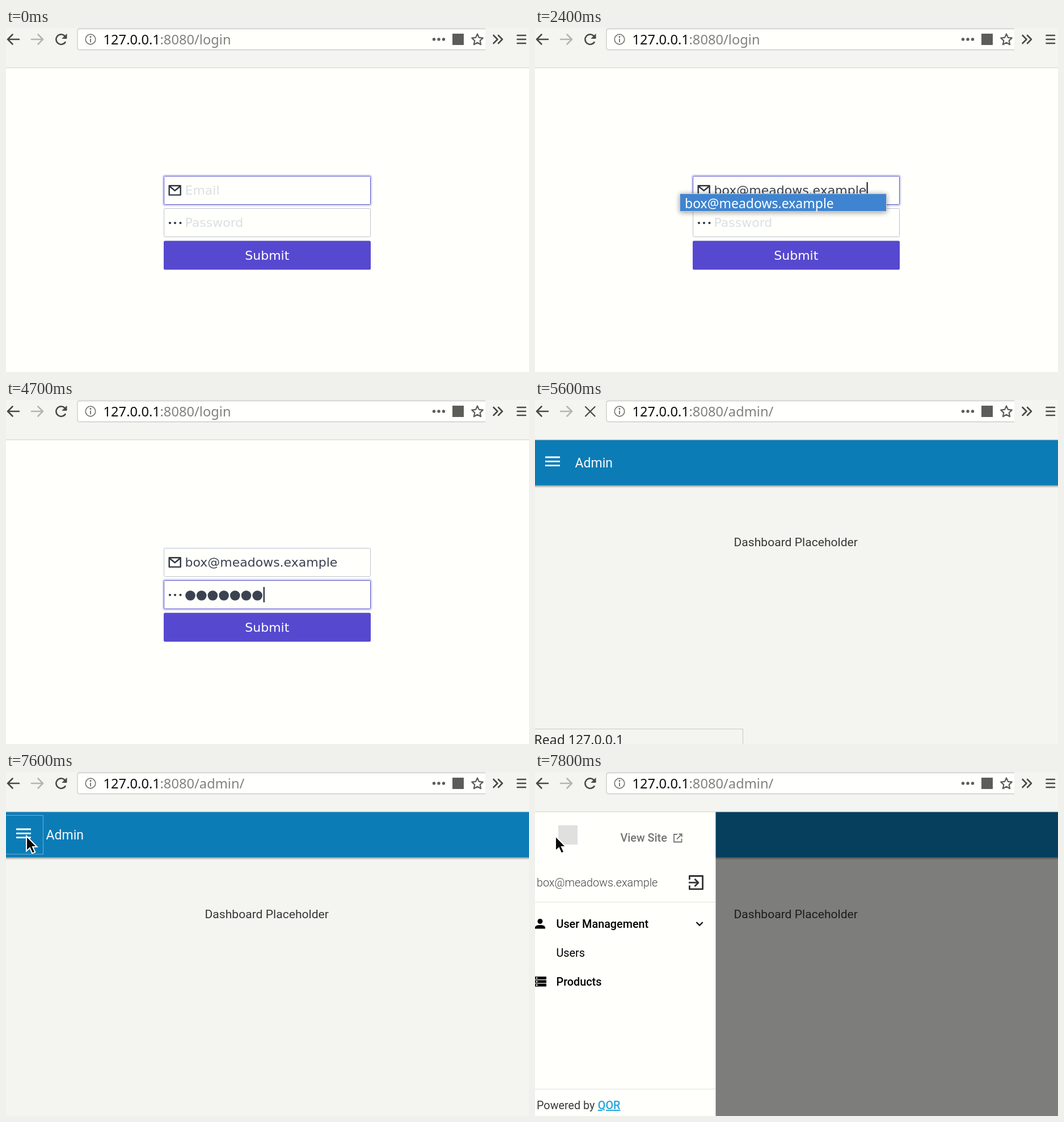
An HTML page that plays this animation: 922x607 px, repeating every 8000 ms.

```html
<!DOCTYPE html>
<html lang="en">
<head>
<meta charset="utf-8">
<title>Login and admin menu</title>
<style>
  html, body { margin: 0; width: 100%; height: 100%; overflow: hidden; background: #fffffc; }
  svg { display: block; width: 922px; height: 607px; }
  text { white-space: pre; }
  .ui { font: 23px "Noto Sans", sans-serif; }
  .url { font-size: 23.7px; }
  .form { font: 22px "DejaVu Sans", sans-serif; }
  .app { font: 19.8px Roboto, sans-serif; }
  .mid { font-weight: 500; }
  .line { fill: none; stroke: #484844; stroke-width: 2.6; stroke-linecap: round; stroke-linejoin: round; }
</style>
</head>
<body>
<svg viewBox="0 0 922 607">
  <defs>
    <filter id="blur" x="-20%" y="-80%" width="140%" height="260%"><feGaussianBlur stdDeviation="5"/></filter>
    <linearGradient id="fall" x2="0" y2="1">
      <stop stop-opacity=".4"/><stop offset="1" stop-opacity="0"/>
    </linearGradient>
  </defs>

  <g id="login">
    <rect y="70" width="922" height="537" fill="#fffffc"/>
    <g fill="#fffffc">
      <rect id="emailRing" x="277" y="260" width="367" height="53" rx="3" fill="none" stroke="#5755d9" stroke-width="3"/>
      <rect id="emailBox" x="278.5" y="261.5" width="364" height="50" rx="2"/>
      <rect id="passRing" x="277" y="317" width="367" height="53" rx="3" fill="none" stroke="#5755d9" stroke-width="3"/>
      <rect id="passBox" x="278.5" y="318.5" width="364" height="50" rx="2"/>
    </g>
    <rect x="278" y="375.5" width="365" height="51" rx="2.5" fill="#5649cf"/>
    <g class="form" fill="#3b4351">
      <path d="M287.7 278.2h20v16.4h-20zM288 279l9.7 8 9.7-8" fill="none" stroke="#303742" stroke-width="2.4" stroke-linejoin="round"/>
      <g fill="#303742"><circle cx="289" cy="344" r="2.1"/><circle cx="298" cy="344" r="2.1"/><circle cx="307.5" cy="344" r="2.1"/></g>
      <text id="emailHint" x="315.5" y="294" fill="#dcdfe2">Email</text>
      <text id="email" x="315.5" y="294"></text>
      <text id="passHint" x="315.5" y="351" fill="#dcdfe2">Password</text>
      <g id="dots"></g>
      <text x="460.3" y="409.3" text-anchor="middle" fill="#fffffc">Submit</text>
    </g>
    <rect id="caret" width="2.4" height="27" fill="#303742"/>
    <g id="popup">
      <rect x="255" y="293" width="365" height="33" opacity=".38" filter="url(#blur)"/>
      <rect id="row" x="255.5" y="292.5" width="364" height="31" stroke="#d0d0ce"/>
      <text id="choice" class="ui" x="264" y="318"></text>
    </g>
  </g>

  <g id="admin" class="app">
    <rect y="70" width="922" height="537" fill="#f4f4f0"/>
    <rect y="150" width="922" height="5" fill="url(#fall)"/>
    <rect y="70" width="922" height="80.5" fill="#0c7cb7"/>
    <path d="M18 101h26M18 108.3h26M18 115.6h26" stroke="#fff" stroke-width="2.8"/>
    <text x="70.5" y="119" font-size="23" fill="#f5fafc">Admin</text>
    <text x="350.5" y="258" font-size="21.1" fill="#373735">Dashboard Placeholder</text>
    <rect id="ring" x="-1" y="76.5" width="66.5" height="68.5" fill="none" stroke="#d5e8f2" stroke-dasharray="1 1"/>
    <rect id="shade" y="70" width="922" height="537"/>
    <g id="drawer">
      <rect y="70" width="318.5" height="537" fill="#fffffc"/>
      <rect x="41" y="94" width="34" height="34" fill="#e0e0de"/>
      <g fill="none" stroke="#757573" stroke-width="1.8">
        <path d="M251 110h-6v13.5h13.5v-6M253.5 109.5h5.3v5.3M258.5 110l-8.5 8.5"/>
        <path d="M272.4 190v-6.500h23.200v23.200h-23.200v-6.500M271 195.200h16M281.500 188.700l6.500 6.500-6.500 6.500" stroke="#333" stroke-width="2.800" stroke-linejoin="round"/>
        <path d="M284.5 265l5.6 5.6 5.6-5.6" stroke="#111" stroke-width="2.3"/>
        <path d="M0 229.5h318M0 559.5h318" stroke="#e0e0de" stroke-width="1"/>
      </g>
      <text class="mid" x="150.5" y="123" fill="#757573">View Site</text>
      <text id="account" x="3" y="202" font-weight="300" fill="#444"></text>
      <circle cx="9" cy="263.5" r="4.5"/>
      <path d="M0 276.5v-2.5q1-4 9-4t9 4v2.5z"/>
      <text class="mid" x="37.5" y="275">User Management</text>
      <text x="37.5" y="326">Users</text>
      <path d="M0 361h20v5H0zM0 367.3h20v5H0zM0 373.6h20v5H0z"/>
      <path d="M1.5 363.5h3M1.5 369.8h3M1.5 376.1h3" stroke="#fffffc" stroke-width="2"/>
      <text class="mid" x="37.5" y="377">Products</text>
      <text x="3" y="595" fill="#3a3a38">Powered by</text>
      <text class="mid" x="110.8" y="595" fill="#25a5dc" text-decoration="underline">QOR</text>
    </g>
  </g>

  <g id="status">
    <rect x="-1" y="580.5" width="367.5" height="30" fill="#f4f4f0" stroke="#c8c8c4"/>
    <text id="message" class="ui" x="-1.5" y="607.5" fill="#2c2c2a"></text>
  </g>

  <rect width="922" height="70" fill="#f4f4f0"/>
  <path d="M0 70.2h922" stroke="#cfcfcb"/>
  <path d="M845 1.5H130q-4 0-4 4v29q0 4 4 4h715z" fill="#fffffc"/>
  <path d="M845 1.5H130q-4 0-4 4v29q0 4 4 4h715" fill="none" stroke="#cbcbc7" stroke-width="1.3"/>
  <g class="line">
    <path d="M3 20h20M11.5 11.5L3 20l8.5 8.5"/>
    <path d="M45 20h20M56.5 11.5L65 20l-8.5 8.5" stroke="#b4b4b0"/>
    <g id="reload">
      <path d="M104.5 25A8.800 8.800 0 1 1 103.500 14"/>
      <path d="M107 11v7.500h-7.500z" fill="#484844" stroke-width="1"/>
    </g>
    <path id="stop" d="M89 12l16.5 16.5M105.5 12L89 28.5" stroke-width="2.3"/>
    <path d="M831 10.5l2.9 6.4 6.9.8-5.1 4.7 1.4 6.9-6.1-3.5-6.1 3.5 1.4-6.9-5.1-4.7 6.9-.8z" stroke="#5c5c58" stroke-width="2.2"/>
    <path d="M859.5 13l7 7-7 7M868 13l7 7-7 7"/>
    <path d="M901.5 13h14.5M901.5 20h14.5M901.5 27h14.5"/>
    <circle cx="149" cy="20" r="8.8" stroke="#777773" stroke-width="1.7"/>
    <path d="M149 19.5v5" stroke="#777773" stroke-width="2"/>
  </g>
  <g fill="#5c5c58">
    <circle cx="149" cy="15.7" r="1.4"/>
    <circle cx="754.5" cy="20" r="2.7"/><circle cx="763" cy="20" r="2.7"/><circle cx="771.5" cy="20" r="2.7"/>
    <rect x="787" y="10" width="20" height="20"/>
  </g>
  <g class="ui">
    <text class="url" x="171.5" y="28.5" fill="#0c0c0d">127.0.0.1</text>
    <text id="path" class="url" x="271.5" y="28.5" fill="#81817e"></text>
  </g>

  <path id="beam" d="M708 280.5q5.5 0 5.5 3v22q0 3-5.5 3M719 280.5q-5.5 0-5.5 3v22q0 3 5.5 3" fill="none" stroke="#111" stroke-width="2"/>
  <path id="arrow" d="M0 0V26.5L6 21l4.3 9.5 5-2.2L11 19h7.5z" fill="#0a0a0a" stroke="#fff" stroke-width="2"/>
</svg>
<script>
const $ = id => document.getElementById(id);
const set = (id, attrs) => { for (const k in attrs) $(id).setAttribute(k, attrs[k]); };
const show = (id, on) => set(id, { visibility: on ? "visible" : "hidden" });
const clamp = x => Math.max(0, Math.min(1, x));
const smooth = x => { x = clamp(x); return x * x * (3 - 2 * x); };
// value of the last [time, value] step reached
const at = (t, steps) => steps.filter(s => t >= s[0]).pop()[1];

const address = "box@meadows.example";
const pitch = 19.7;
$("choice").textContent = $("account").textContent = address;
for (let i = 0; i < 8; i++) {
  const c = document.createElementNS("http://www.w3.org/2000/svg", "circle");
  c.setAttribute("cx", 325 + i * pitch);
  c.setAttribute("cy", 345);
  c.setAttribute("r", 8.8);
  $("dots").append(c);
}

function focus(name, k) {
  set(name + "Ring", { "stroke-opacity": .22 * k });
  set(name + "Box", { stroke: `rgb(${188 - 101 * k},${195 - 110 * k},${206 + 2 * k})` });
}

function drawLogin(t) {
  const typed = at(t, [[0, 0], [800, 1], [900, 2], [1300, 3], [2400, address.length]]);
  const count = at(t, [[0, 0], [3700, 1], [3900, 2], [4100, 3], [4200, 5], [4300, 6], [4700, 7], [4800, 8]]);
  const k = clamp((t - 2800) / 300);
  focus("email", 1 - k);
  focus("pass", k);
  $("email").textContent = address.slice(0, typed);
  show("emailHint", !typed);
  show("passHint", !count);
  [...$("dots").children].forEach((c, i) => c.setAttribute("visibility", i < count ? "visible" : "hidden"));

  const inPass = t >= 2900;
  set("caret", {
    x: 315.7 + (inPass ? count * pitch : typed && $("email").getComputedTextLength()),
    y: inPass ? 330 : 272
  });
  show("caret", t >= 800 && t < 5100 && !(t >= 3500 && t < 3700));

  const picked = t >= 2400;
  show("popup", t >= 1100 && t < 2500);
  set("row", { fill: picked ? "#3f84d0" : "#fffffc" });
  set("choice", { fill: picked ? "#fff" : "#0c0c0c" });
}

function drawAdmin(t) {
  const open = at(t, [[0, 0], [7700, .78], [7800, 1]]);
  set("drawer", { transform: `translate(${-319 * (1 - open)})` });
  set("shade", { opacity: .49 * open });
  show("ring", t >= 7600);
}

function drawBrowser(t) {
  $("path").textContent = t < 5400 ? ":8080/login" : ":8080/admin/";
  const busy = t >= 5100 && t < 6200;
  show("stop", busy);
  show("reload", !busy);
  set("reload", { transform: t === 6200 ? "rotate(-60 97 20)" : "" });
  const text = at(t, [[0, ""], [5200, "Waiting for "], [5400, "Transferring data from "],
    [5600, "Read "], [5700, "Transferring data from "], [5800, "Read "], [6000, ""]]);
  show("status", text);
  $("message").textContent = text + "127.0.0.1" + (text.length > 5 ? "…" : "");
}

function drawPointer(t) {
  show("beam", t >= 6600 && t < 7000);
  show("arrow", t >= 7000);
  const p = smooth((t - 6900) / 600);
  set("arrow", { transform: `translate(${713 - 677 * p} ${294 - 181 * p})` });
}

function frame(now) {
  const t = Math.floor(now % 8000 / 100) * 100;
  const inside = t >= 5600;
  set("login", { display: inside ? "none" : "inline" });
  set("admin", { display: inside ? "inline" : "none" });
  if (inside) drawAdmin(t); else drawLogin(t);
  drawBrowser(t);
  drawPointer(t);
  requestAnimationFrame(frame);
}
frame(0);
</script>
</body>
</html>
```
